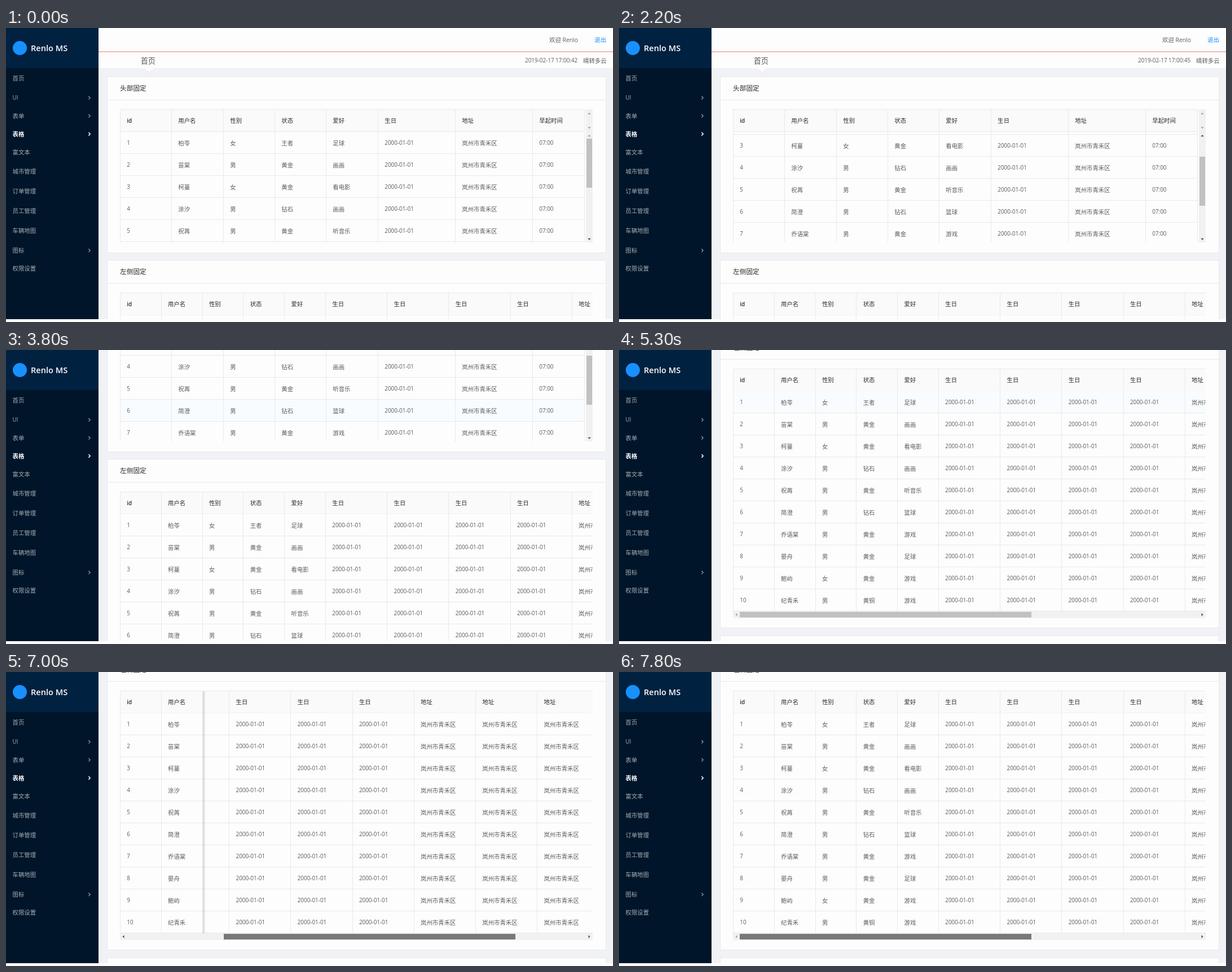
An HTML page for the animation above (8 s loop, 1076 px wide and 521 px high).

```html
<!DOCTYPE html>
<html lang="zh">
<head>
<meta charset="utf-8">
<title>Admin tables</title>
<style>
  html, body { margin: 0; width: 100%; height: 100%; overflow: hidden; background: #fdfdfd; }
  svg { display: block; width: 100vw; height: 100vh; }
  text { font-family: "Open Sans", "Noto Sans CJK SC", "Noto Sans CJK", sans-serif; white-space: pre; }
</style>
</head>
<body>
<svg id="stage" viewBox="0 0 1076 521"></svg>
<script>
const WHITE = '#fdfdfd', LINE = '#e9e9e9', BODY = '#5c5c5c', DARK = '#2a2a2a';
const LEFT = 202.5, RIGHT = 1040, ROW = 39, ROWS = 10, WHEEL = 72.8, LOOP = 8000;

// ---- drawing helpers ----
const rect = (x, y, w, h, fill, more = '') =>
  `<rect x="${x}" y="${y}" width="${w}" height="${h}" fill="${fill}" ${more}/>`;
const path = (d, stroke, more = '') => `<path d="${d}" fill="none" stroke="${stroke}" ${more}/>`;
// y is the vertical middle of the glyphs
const text = (x, y, str, fill = BODY, size = 0, more = '') => {
  const px = size || (/[^\x00-\x7f]/.test(str) ? 10.4 : 9.9);
  return `<text x="${x}" y="${(y + px * 0.37).toFixed(2)}" font-size="${px}" fill="${fill}" ${more}>${str}</text>`;
};
const clip = (id, x, y, w, h) => `<clipPath id="${id}">${rect(x, y, w, h, '#000')}</clipPath>`;
const clipped = (id, inner) => `<g clip-path="url(#${id})">${inner}</g>`;
const arrow = (x, y, turn, fill, id = '') =>
  `<path id="${id}" d="M-2.8 1.5L0 -1.5L2.8 1.5Z" fill="${fill}" transform="translate(${x} ${y}) rotate(${turn})"/>`;
const crisp = v => Math.floor(v) + 0.5;

// ---- table data ----
const split = s => s.split(' ');
const users = split('柏苓 苗棠 柯蔓 涂汐 祝苒 简澄 乔语棠 晏舟 鲍屿 纪青禾');
const sexes = [...'女男女男男男男男女男'];
const ranks = split('王者 黄金 黄金 钻石 黄金 钻石 黄金 黄金 黄金 黄铜');
const hobbies = split('足球 画画 看电影 画画 听音乐 篮球 游戏 足球 游戏 游戏');
const cell = {
  id: i => String(i + 1),
  用户名: i => users[i],
  性别: i => sexes[i],
  状态: i => ranks[i],
  爱好: i => hobbies[i],
  生日: () => '2000-01-01',
  地址: () => '岚州市青禾区',
  早起时间: () => '07:00'
};

function table(cols, top) {
  const xs = [LEFT];
  cols.forEach(([, w]) => xs.push(xs[xs.length - 1] + w));
  const end = xs[cols.length], width = end - LEFT, first = top + ROW;
  const rules = (y, h) => xs.map(x => `M${crisp(x)} ${y}v${h}`).join('');
  const across = y => `M${LEFT} ${y}H${end}`;
  const head = rect(LEFT, top, width, ROW, '#fafafa') +
    path(rules(top, ROW) + across(top) + across(first), LINE) +
    cols.map(([name], c) => text(xs[c] + 11.8, top + 20, name, DARK, 0,
      name === 'id' ? 'font-weight="600"' : '')).join('');
  let lines = rules(first, ROW * ROWS), cells = '';
  for (let i = 0; i < ROWS; i++) {
    lines += across(first + ROW * (i + 1));
    cols.forEach(([name], c) => {
      cells += text(xs[c] + 11.8, first + ROW * i + 20.2, cell[name](i));
    });
  }
  const body = rect(LEFT, first, width, ROW * ROWS, WHITE) +
    rect(LEFT, first, width, ROW, '#f8fcff', 'class="hover"') + path(lines, LINE) + cells;
  return { head, body };
}

const card = (y, h, title) =>
  rect(179.5, y, 884, h, WHITE, `stroke="#e8e9eb"`) +
  path(`M180 ${y + 41}H1063`, LINE) + text(202, y + 20.6, title, DARK, 11.7);

// ---- page parts ----
const names = split('id 用户名 性别 状态 爱好 生日 地址 早起时间');
const widths = [91, 92, 91, 91, 92, 137, 137, 92];
const tall = table(names.map((n, i) => [n, widths[i]]), 144.5);

const wideNames = split('id 用户名 性别 状态 爱好 生日 生日 生日 生日 地址 地址 地址 地址 早起时间');
const wideCols = wideNames.map(n => [n, /生日|地址/.test(n) ? 109.2 : WHEEL]);
const wide = table(wideCols, 469.5);
const pinned = table(wideCols.slice(0, 2), 469.5);

const topBar =
  rect(164, 0, 912, 71, WHITE) + rect(164, 41.5, 912, 1.2, '#f88a8c') +
  `<path d="M246 71h16l-8 6.5z" fill="${WHITE}"/>` +
  text(963, 21, '欢迎 Renlo') + text(1043, 21, '退出', '#1890ff') +
  text(238.7, 57.7, '首页', BODY, 13.2) +
  `<g id="clock">${text(920, 57.7, '2019-02-17 17:00:42')}</g>` + text(1023, 57.7, '晴转多云');

const tallCard = card(86.5, 312, '头部固定') + tall.head +
  rect(1028, 144, 12, 236, '#f1f1f1') +
  arrow(1034, 151.5, 0, '#a3a3a3') + arrow(1034, 177, 180, '#a3a3a3') +
  clipped('tallBox', `<g id="tall">${tall.body}</g>`) +
  arrow(1034, 190.8, 0, '#505050', 'up') + arrow(1034, 374.3, 180, '#505050') +
  rect(1029, 196, 10, 87, '#c1c1c1', 'id="tallThumb"');

const wideCard = card(411.5, 517, '左侧固定') +
  clipped('wideBox', `<g id="wide">${wide.head}${wide.body}</g>`) +
  rect(348, 470, 6, 429, 'url(#shade)', 'id="shadow"') +
  clipped('wideBox', pinned.head + pinned.body) +
  rect(202, 899, 838, 12, '#f1f1f1') +
  arrow(208, 905, -90, '#505050', 'back') + arrow(1034, 905, 90, '#505050') +
  rect(214, 900, 517, 10, '#c1c1c1', 'id="wideThumb"');

const menu = [['首页', 88.8], ['UI', 123.8, 1], ['表单', 155.8, 1], ['表格', 187.8, 1], ['富文本', 219.8],
  ['城市管理', 254.5], ['订单管理', 289.5], ['员工管理', 324.5], ['车辆地图', 359.5], ['图标', 394.3, 1], ['权限设置', 426.3]];

const sidebar = rect(0, 0, 164, 516, '#001529') + rect(0, 0, 164, 71, '#002140') +
  '<circle cx="24.5" cy="35.5" r="12.5" fill="#1890ff"/>' +
  text(44, 36, 'Renlo MS', '#fff', 14.6, 'font-weight="600"') +
  menu.map(([label, y, more]) => {
    const on = label === '表格', ink = on ? '#fff' : '#a6adb4';
    return text(11.5, y, label, ink, 0, on ? 'font-weight="700"' : '') +
      (more ? path(`M146.4 ${y - 2.8}l2.8 2.8l-2.8 2.8`, ink, `stroke-width="${on ? 1.5 : 1.1}"`) : '');
  }).join('');

document.getElementById('stage').innerHTML =
  '<defs>' + clip('pageBox', 164, 0, 912, 516) + clip('tallBox', 202, 184, 824, 196) +
  clip('wideBox', 202, 469, RIGHT - 202, 430) +
  '<linearGradient id="shade"><stop stop-opacity=".2"/><stop offset="1" stop-opacity="0"/></linearGradient></defs>' +
  rect(0, 0, 1076, 521, WHITE) +
  clipped('pageBox', rect(164, 0, 912, 516, '#f0f2f5') +
    `<g id="page">${topBar}${tallCard}${wideCard}${card(942.5, 300, '')}</g>`) +
  sidebar;

// ---- motion ----
const $ = id => document.getElementById(id);
const [tallHover, wideHover, pinHover] = document.querySelectorAll('.hover');
const clock = $('clock').firstChild;

// value of the latest [time, value] step
const at = (t, steps) => steps.reduce((v, [time, next]) => t >= time ? next : v, steps[0][1]);
const swing = u => 0.5 - 0.5 * Math.cos(Math.PI * Math.min(1, Math.max(0, u)));
const move = (id, x, y) => $(id).setAttribute('transform', `translate(${x} ${y})`);
const hover = (el, top, row) => {
  el.setAttribute('visibility', row ? 'visible' : 'hidden');
  el.setAttribute('y', top + ROW * (row - 1));
};

function draw(ms) {
  const t = Math.floor(ms / 100) * 100;

  const pageTicks = at(t, [[0, 0], [3000, 1], [3100, 2], [3800, 3], [4300, 4], [4400, 5], [5300, 6]]);
  move('page', 0, -Math.round(pageTicks * 72.7));
  clock.textContent = '2019-02-17 17:00:' + at(t, [[0, 42], [400, 43], [1400, 44], [2200, 45]]);

  const down = Math.round(WHEEL * at(t, [[0, 0], [1300, 1], [1400, 2], [2000, 1]]));
  move('tall', 0, -down);
  move('tallThumb', 0, Math.round(down * 0.44));
  $('up').setAttribute('fill', down ? '#505050' : '#a3a3a3');
  hover(tallHover, 183.5, at(t, [[0, 0], [1700, 6], [2000, 0], [2600, 4], [3100, 0], [3800, 6], [4300, 0]]));

  // thumb is dragged right, then back
  const drag = Math.round(t <= 7300 ? 217 * swing((t - 6300) / 1000) : 217 * swing((7800 - t) / 500));
  const across = Math.round(drag * 1.628);
  move('wide', -across, 0);
  move('wideThumb', drag, 0);
  $('wideThumb').setAttribute('fill', at(t, [[0, '#c1c1c1'], [6100, '#a8a8a8'], [6400, '#787878']]));
  $('back').setAttribute('fill', across ? '#505050' : '#a3a3a3');
  $('shadow').setAttribute('visibility', across ? 'visible' : 'hidden');
  const row = at(t, [[0, 0], [5300, 1], [5600, 4], [5700, 5], [5800, 7], [5900, 8], [6000, 10], [6100, 0]]);
  hover(wideHover, 508.5, row);
  hover(pinHover, 508.5, row);
}

const start = performance.now();
function frame() {
  draw((performance.now() - start) % LOOP);
  requestAnimationFrame(frame);
}
frame();
</script>
</body>
</html>
```
